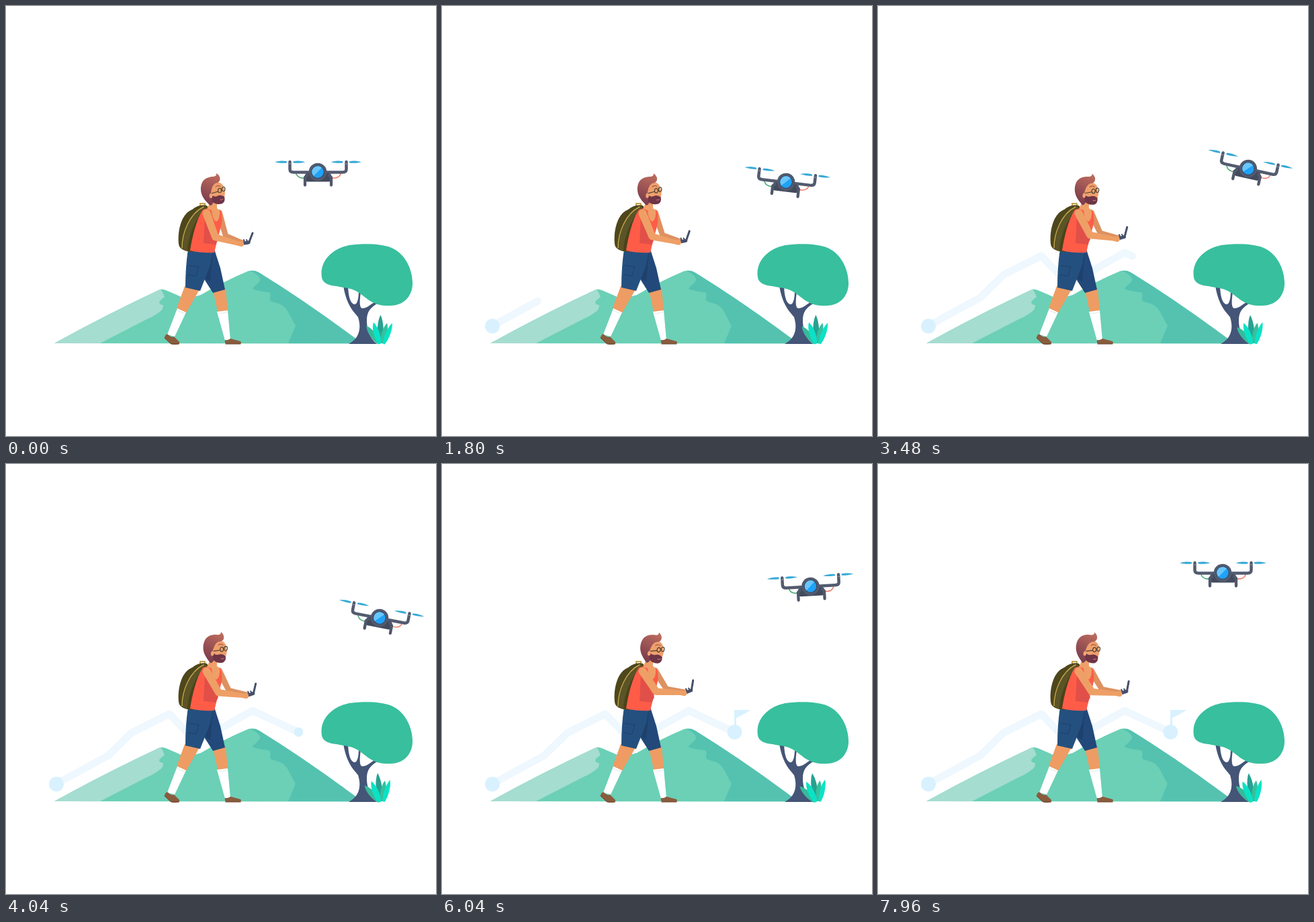
Recreate the animation shown at these times as an HTML page. Size 640 px wide and 640 px high, loop 8 s.

```html
<!DOCTYPE html>
<html lang="en">
<head>
<meta charset="utf-8">
<title>Hiker with drone</title>
<style>
  html, body { margin: 0; width: 100%; height: 100%; overflow: hidden; background: #fff; }
  svg { display: block; width: 100vw; height: 100vh; }
  .line { fill: none; stroke-linecap: round; stroke-linejoin: round; }
</style>
</head>
<body>
<svg viewBox="0 0 640 640">
  <defs>
    <linearGradient id="hairTone" x1="0.6" y1="0" x2="0.4" y2="1">
      <stop offset="0" stop-color="#bd6c5e"/>
      <stop offset="1" stop-color="#77394a"/>
    </linearGradient>
    <path id="leaf" d="M-2 0C-6 -10 -6 -24 -1 -32C4 -25 6 -10 2 0Z"/>
    <path id="blade" d="M0 0C6 -2 13 -2.4 17.5 -1.4Q19 0 17.5 1C12 1.6 6 1 0 0Z" fill="#36a9d6"/>
    <g id="rotor">
      <use href="#blade" x="-22.500"/>
      <use href="#blade" transform="translate(23) scale(-1 1)"/>
    </g>
  </defs>

  <!-- route -->
  <path id="route" class="line" d="M75 476L152 434L187 400L243 372L271 401L290 410L367 367L435 399"
        pathLength="1000" stroke="#eef8fe" stroke-width="11"/>
  <circle id="start" cx="75" cy="476.500" fill="#d9f1fe"/>
  <circle id="goal" cx="435.500" cy="399" fill="#d9f1fe"/>
  <g id="flag" fill="#d9f1fe">
    <path d="M435 366H459.500L450 372L438 378V399H435Z"/>
  </g>

  <!-- mountains -->
  <path fill="#6bd0b6" d="M72 502Q150 459 227 423Q231 420 238 423L268 436L290 430Q326 409 357 396Q366 391 377 397Q450 442 530 502.500Z"/>
  <path fill="#a5ddd0" d="M72 502Q150 459 227 423L231 422L236 433Q228 439 228 441Q229 445 234 445Q234 452 229 455Q220 462 212 465L140 502Z"/>
  <path fill="#55c2b0" d="M364 394C370 398 379 402 378 408C376 414 368 417 367 421C374 425 389 425 393 427C395 433 390 438 396 440C405 443 411 443 418 452L431 476L420 502H530Q450 442 377 397Q371 393 364 394Z"/>

  <!-- tree -->
  <path fill="#445577" d="M510 503C524 496 530 482 524 463C520 457 507 448 502 416L509 418C510 435 513 442 518 444C523 445 525 435 525 424L528 426C526 440 526 449 530 450C536 450 541 446 549 440L554 442C542 449 537 455 537 468C537 485 545 499 553 503Z"/>
  <path fill="#38bf9e" d="M470 404C466 378 488 360 511 356C534 353 560 354 574 360C597 370 606 397 605 415C604 434 590 446 572 446C548 447 541 438 527 428C516 419 504 420 492 417C480 416 471 412 470 404Z"/>
  <g id="plant">
    <use href="#leaf" transform="translate(555 502) rotate(-34)" fill="#37ba9b"/>
    <use href="#leaf" transform="translate(557 502) rotate(2) scale(1 1.320)" fill="#27a191"/>
    <use href="#leaf" transform="translate(559 502) rotate(17) scale(.9 .97)" fill="#38bf9e"/>
    <use href="#leaf" transform="translate(556 503) rotate(-14) scale(1 1.050)" fill="#0be2c5"/>
    <use href="#leaf" transform="translate(562 503) rotate(24) scale(.8 1.050)" fill="#0be2c5"/>
  </g>

  <!-- legs -->
  <path fill="#ee9c63" d="M266 417L288 422L268 457L254 450Z"/>
  <path fill="#ee9c63" d="M308 423L327 420L330 454L315 455Z"/>
  <path fill="#fff" d="M255 450L268 456L251 492L240 489Z"/>
  <path fill="#fff" d="M314 455L330 453L334 497L326 498Z"/>
  <path class="line" stroke="#e1e6e6" d="M255 453L266 458M316 457Q324 458 329 455"/>
  <path fill="#8a5c3e" d="M240 488Q236 490 236 494L245 503Q252 505 258 503V500L250 492Q246 494 240 488Z"/>
  <path fill="#8a5c3e" d="M326 497Q325 500 327 503H349Q351 501 349 499L334 495Q330 498 326 497Z"/>
  <path class="line" stroke="#6a4630" d="M236 494L246 503H257M327 503H349"/>
  <path fill="#22497a" d="M295 362H310L319 390L326 422L308 427L294 405Z"/>
  <path fill="#1e406b" d="M308 364L304 410L295 405Z"/>
  <path fill="#24507f" d="M271 362L308 362L304 386L289 424L267 419Q267 388 271 362Z"/>
  <path class="line" stroke="#1d416c" d="M272 386L287 388L283 402L271 400"/>

  <path id="farArm" fill="#de9160"/>

  <!-- backpack -->
  <path class="line" stroke="#c1a04a" stroke-width="2" d="M289 298V294H296V298"/>
  <path fill="#4e471c" d="M257 354C255 330 263 308 277 303Q288 294 299 297L302 302L278 366Q258 365 257 354Z"/>
  <path fill="#5b5427" d="M263 361C263 338 274 309 294 298L303 301L278 366Q268 365 263 361Z"/>
  <path fill="#4a431b" d="M270 364C271 342 282 315 299 299L303 301L278 366Z"/>
  <path class="line" stroke="#c5a54c" stroke-width="1.400" d="M262 360C262 338 273 309 294 299"/>

  <!-- torso -->
  <path fill="#ff5c48" d="M274 364C277 345 283 318 293 303L304 300L317 303L320 306Q323 318 320 328Q315 346 310 367Q291 368 274 364Z"/>
  <path fill="#e14f49" d="M296 312L316 347L312 355L294 353Z"/>
  <path fill="#ef9f68" d="M304 291L314 291L314 301L318 304Q319 318 313 321Q307 318 306 304L299 302Z"/>

  <g id="remote" class="line" stroke="#46506a">
    <path stroke-width="5" d="M5 -1L11 -2"/>
    <path stroke-width="3" d="M12 -3L17 -16"/>
    <path stroke-width="2" d="M5 -3L4 -6M9 -4L8 -6"/>
  </g>
  <path id="nearArm" fill="#ee9f66"/>

  <g id="head">
    <path fill="#ef9f6c" d="M303 268L315 262Q322 263 324 270L326 277L325 287L312 292L303 288Z"/>
    <path fill="url(#hairTone)" d="M304 297C297 290 289 283 290 270C291 259 298 255 307 254Q314 254 313 249C319 252 321 260 315 263C308 264 306 270 305 279L309 290Q308 296 304 297Z"/>
    <path fill="#6f3446" d="M305 280Q309 285 314 283Q320 280 325 284Q327 291 322 294Q313 297 307 291Z"/>
    <ellipse cx="305" cy="282.500" rx="2.300" ry="3.500" fill="#f0a476"/>
    <path class="line" stroke="#d9978c" stroke-width=".8" d="M319 288.500Q321 289 323 287.500"/>
    <path class="line" stroke="#8d4b47" d="M312 269Q315 266 319 268"/>
    <g fill="none" stroke="#43402f" stroke-width="1.100">
      <ellipse cx="318" cy="274.500" rx="2.500" ry="3.300"/>
      <ellipse cx="323.700" cy="272.500" rx="2.300" ry="3.300"/>
      <path d="M306 279L315.500 276"/>
    </g>
  </g>

  <g id="drone">
    <path class="line" stroke="#4aa873" stroke-width="1.500" d="M-32 3Q-29 10 -19 9"/>
    <path class="line" stroke="#f27a68" stroke-width="1.500" d="M34 3Q32 10 20 9"/>
    <path class="line" stroke="#535b70" stroke-width="4.500" d="M-41.500 -15V-4Q-41.500 .5 -36 .5H37Q42.500 .5 42.500 -4V-15"/>
    <rect x="-19" y="2" width="39" height="12.500" rx="4" fill="#434a5c"/>
    <path class="line" stroke="#50586c" stroke-width="4.300" d="M-16 5L-19 8V19.500M17 5L20 8V19.500"/>
    <circle r="13.300" fill="#525a6e"/>
    <circle r="9.800" fill="#3d4964"/>
    <circle r="8.700" fill="#1fa2f7"/>
    <path fill="#69c6fa" d="M-6.300 6A8.700 8.700 0 0 1 6 -6.300Z"/>
    <path stroke="#8f96a5" d="M-43.500 -12H-39.500M40.500 -12H44.500"/>
    <use href="#rotor" x="-41.500" y="-14.500"/>
    <use href="#rotor" x="42" y="-14.500"/>
  </g>
</svg>
<script>
const LOOP = 8000;
const $ = id => document.getElementById(id);
const mix = (a, b, k) => a + (b - a) * k;
const mixPoint = (a, b, k) => a.map((v, i) => mix(v, b[i], k));
const span = (t, from, to) => Math.min(1, Math.max(0, (t - from) / (to - from)));
const smooth = k => k * k * (3 - 2 * k);

// Flight keys: time, x, y, tilt
const flight = [
  [0, 464, 247, 0], [1800, 512, 262, 6.8], [2920, 542, 253, 12.2], [4040, 556, 229, 11],
  [4920, 554, 208, 4.8], [6040, 548.5, 182, -3.3], [6840, 539, 166.5, -3], [7960, 513, 162, 0]
];

// Cubic Hermite curve through the keys
function fly(t, c) {
  const last = flight.length - 1;
  let i = 0;
  while (i < last - 1 && t > flight[i + 1][0]) i++;
  const slope = j => {
    const a = flight[Math.max(0, j - 1)], b = flight[Math.min(last, j + 1)];
    return (b[c] - a[c]) / (b[0] - a[0]);
  };
  const [a, b] = [flight[i], flight[i + 1]];
  const d = b[0] - a[0], k = span(t, a[0], b[0]), r = 1 - k;
  return smooth(r) * a[c] + smooth(k) * b[c] + d * k * r * (r * slope(i) - k * slope(i + 1));
}

// Tapered limb with round joints; each joint is [x, y, radius]
function limb(joints) {
  let d = '';
  joints.forEach(([x, y, r], i) => {
    d += `M${x - r} ${y}a${r} ${r} 0 1 1 ${2 * r} 0a${r} ${r} 0 1 1 ${-2 * r} 0Z`;
    if (!i) return;
    const [px, py, pr] = joints[i - 1];
    const len = Math.hypot(x - px, y - py);
    const nx = (y - py) / len, ny = (px - x) / len;
    d += `M${px + nx * pr} ${py + ny * pr}L${x + nx * r} ${y + ny * r}` +
         `L${x - nx * r} ${y - ny * r}L${px - nx * pr} ${py - ny * pr}Z`;
  });
  return d;
}

const place = (id, value) => $(id).setAttribute('transform', value);

function draw(t) {
  place('drone', `translate(${fly(t, 1)} ${fly(t, 2)}) rotate(${fly(t, 3)})`);

  const sway = (1 - Math.cos(Math.PI * t / 6600)) / 2;
  place('head', `rotate(${12 * sway} 310 298)`);
  place('plant', `rotate(${-9 * sway} 558 502)`);

  const hand = mixPoint([350, 354], [360.5, 341], sway);
  place('remote', `translate(${hand}) rotate(${-12 * sway})`);
  $('nearArm').setAttribute('d', limb([
    [298.5, 308.5, 6], [...mixPoint([311.5, 344], [319, 338.5], sway), 5.3],
    [hand[0] - 5, hand[1] - 0.5, 3.2], [...hand, 4]
  ]));
  $('farArm').setAttribute('d', limb([
    [317, 308, 5], [...mixPoint([327, 342], [334, 334.5], sway), 4],
    [hand[0] + 2, hand[1] - 3, 2.5]
  ]));

  const drawn = 1000 * span(t, 1350, 3850);
  $('route').style.visibility = drawn ? 'visible' : 'hidden';
  $('route').setAttribute('stroke-dasharray', `${drawn} 2000`);
  $('start').setAttribute('r', 11 * smooth(span(t, 650, 1100)));
  $('goal').setAttribute('r', 11 * smooth(span(t, 3800, 4210)));
  place('flag', `translate(436 399) scale(${smooth(span(t, 4300, 4850))}) translate(-436 -399)`);
}

const begin = performance.now();
function tick() {
  draw((performance.now() - begin) % LOOP);
  requestAnimationFrame(tick);
}
tick();
</script>
</body>
</html>
```
